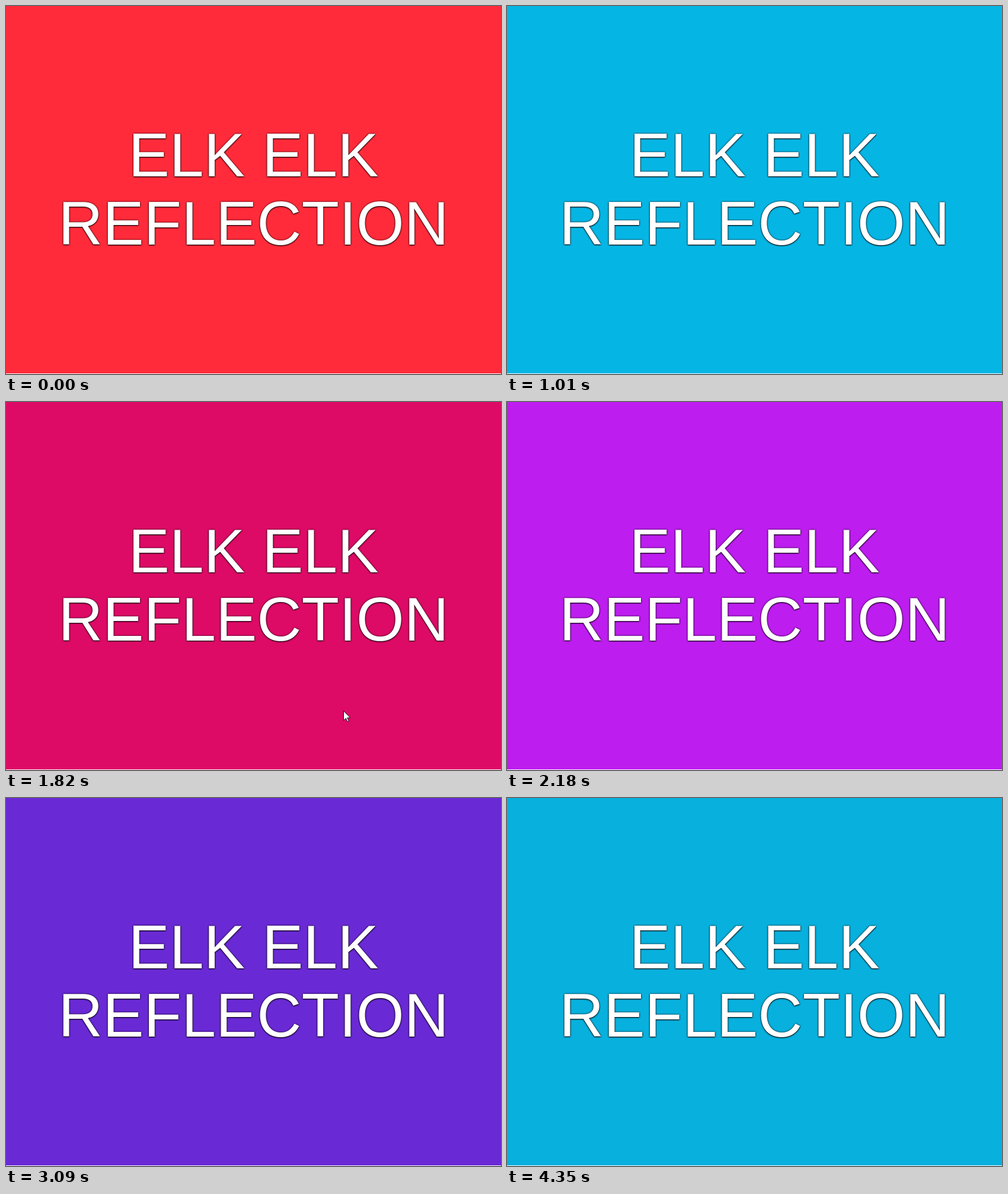
Animation of 835x620 px, one loop 4450 ms. Source, as an HTML page:

```html
<!DOCTYPE html>
<html lang="en">
<head>
<meta charset="utf-8">
<title>Elk Elk Reflection</title>
<style>
  html, body { margin: 0; width: 100%; height: 100%; overflow: hidden; }
  #stage {
    position: relative; width: 835px; height: 620px; overflow: hidden;
    box-sizing: border-box; border-bottom: 1px solid #fff; background: #ff2b3a;
  }
  h1 {
    position: absolute; left: 0; top: 194px; width: 835px; margin: 0;
    font: 400 104px/115px "Liberation Sans", Arial, sans-serif;
    font-kerning: none; text-align: center; white-space: nowrap; color: #fff;
    text-shadow: 0 1px 2px #000, 0 0 3px rgba(0, 0, 0, .85);
  }
  #cursor { position: absolute; left: 0; top: 0; overflow: visible; visibility: hidden; }
</style>
</head>
<body>
<div id="stage">
  <h1>ELK ELK<br>REFLECTION</h1>
  <svg id="cursor" width="13" height="20">
    <path d="M.5 .5V16.5L4.3 12.9L7 18.6L9.3 17.6L6.7 12H11.8Z" fill="#fff" stroke="#111" stroke-width="1"/>
  </svg>
</div>
<script>
const LOOP = 4450;
const stage = document.getElementById('stage');
const cursor = document.getElementById('cursor');

// The picture holds for about 90 ms at a time.
const holds = Array(49).fill(90);
for (const i of [4, 5, 24, 25, 48]) holds[i] = 100;
holds[31] = 80;
let sum = 0;
const starts = holds.map(ms => (sum += ms) - ms);

// time, then red, green, blue
const colors = [
  [0, 255, 43, 58],
  [560, 45, 116, 244],
  [1370, 0, 191, 165],
  [1820, 221, 10, 102],
  [2560, 70, 82, 234],
  [3630, 138, 45, 157],
  [4350, 7, 176, 221]
].map(([t, ...rgb]) => [t, ...toHsl(rgb)]);

// time, then x, y of the pointer tip
const path = [
  [1280, 850, 455],
  [1370, 801, 466],
  [1820, 569, 520],
  [2000, 492, 566],
  [2180, 450, 625]
];

function toHsl(rgb) {
  const [r, g, b] = rgb.map(v => v / 255);
  const max = Math.max(r, g, b), min = Math.min(r, g, b), d = max - min;
  const l = (max + min) / 2;
  const h = max === r ? (g - b) / d : max === g ? (b - r) / d + 2 : (r - g) / d + 4;
  return [(h * 60 + 360) % 360, d / (1 - Math.abs(2 * l - 1)) * 100, l * 100];
}

function sample(table, t) {
  const i = Math.max(1, table.findIndex(row => row[0] >= t));
  const a = table[i - 1], b = table[i];
  const k = (t - a[0]) / (b[0] - a[0]);
  return a.slice(1).map((v, n) => v + (b[n + 1] - v) * k);
}

function draw() {
  const now = performance.now() % LOOP;
  const t = starts.findLast(s => s <= now);
  const [h, s, l] = sample(colors, t);
  stage.style.backgroundColor = `hsl(${h} ${s}% ${l}%)`;

  const shown = t >= path[0][0] && t <= path.at(-1)[0];
  cursor.style.visibility = shown ? 'visible' : 'hidden';
  if (shown) {
    const [x, y] = sample(path, t).map(Math.round);
    cursor.style.transform = `translate(${x}px, ${y}px)`;
  }
  requestAnimationFrame(draw);
}
draw();
</script>
</body>
</html>
```
